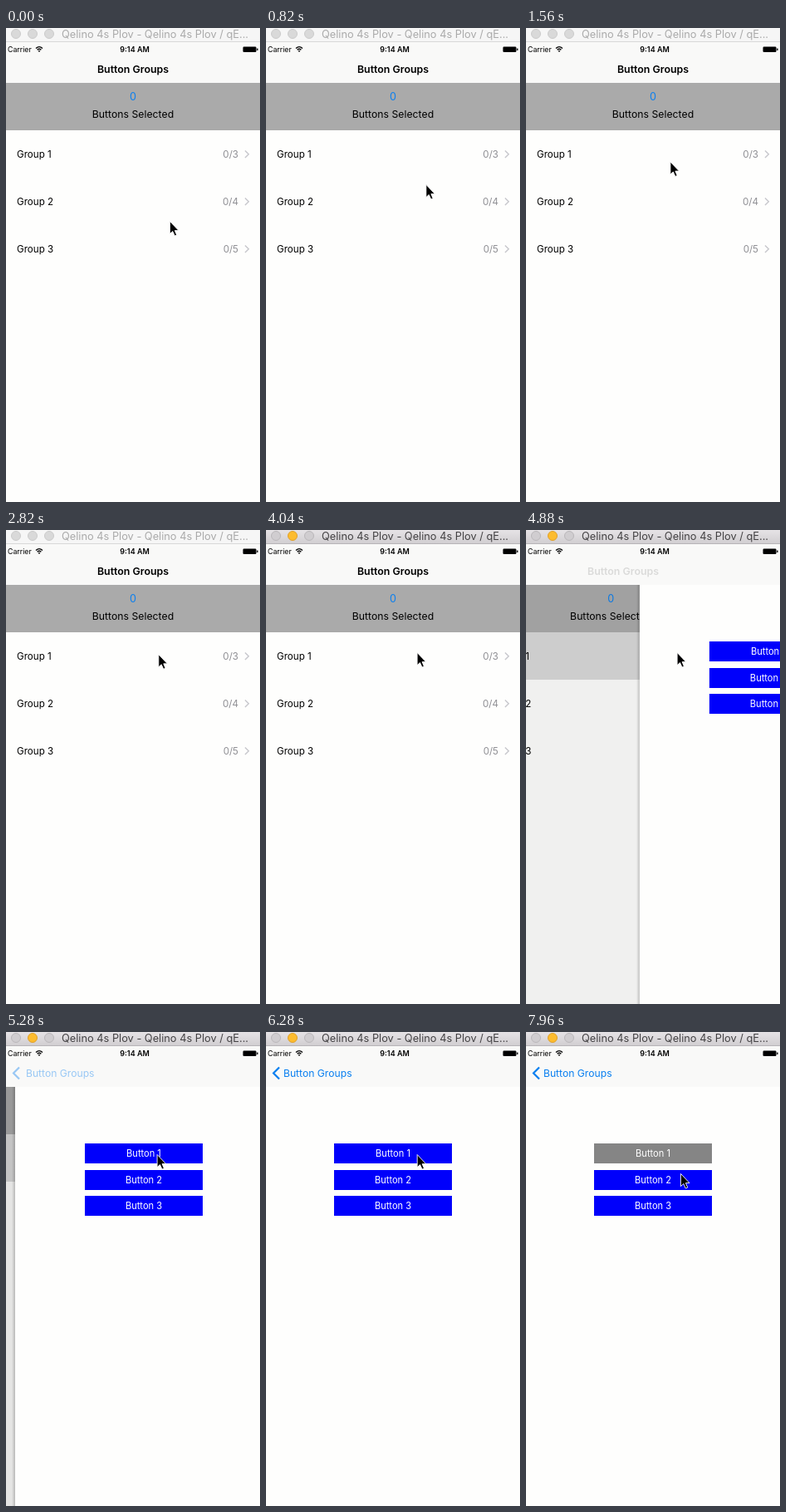
These frames come from a looping animation (306 px wide and 570 px high, 8 s). An HTML page:

```html
<!DOCTYPE html>
<html lang="en">
<head>
<meta charset="utf-8">
<title>Button Groups</title>
<style>
html, body { margin: 0; width: 100%; height: 100%; overflow: hidden; }
svg { display: block; width: 306px; height: 570px; background: #fefefd; font: 11.6px Inter, "Liberation Sans", sans-serif; }
.mid { text-anchor: middle; }
.end { text-anchor: end; }
#bar circle { fill: #d9d9d9; stroke: #cbcbcb; }
#bar text { font-size: 12.8px; fill: #aaa; }
#bar.active circle { fill: #d0cdd0; stroke: #bab7ba; }
#bar.active #amber { fill: #fdbc2e; stroke: #dfa02a; }
#bar.active text { fill: #444244; }
#title { font-size: 12.4px; font-weight: 600; }
#back text { font-size: 12.15px; fill: #0a7ff0; }
.count { fill: #8e8e93; }
.line { fill: none; stroke-width: 1.4; stroke: #c7c7cc; }
</style>
</head>
<body>
<svg viewBox="0 0 306 570">
  <defs>
    <linearGradient id="metal" x2="0" y2="1">
      <stop stop-color="#e6e3e6"/><stop offset="1" stop-color="#d0cdd0"/>
    </linearGradient>
    <linearGradient id="shade">
      <stop stop-opacity="0"/><stop offset="1" stop-opacity=".2"/>
    </linearGradient>
  </defs>

  <g id="list">
    <rect y="66" width="306" height="57" fill="#aaa"/>
    <text class="mid" x="153" y="87" font-size="12.6" fill="#0a7ff0">0</text>
    <text class="mid" x="153" y="108" font-size="12.25">Buttons Selected</text>
    <rect id="mark" y="123" width="306" height="57" fill="#d9d9d9"/>
  </g>
  <rect id="dim" y="66" width="306" height="504"/>

  <g id="page">
    <rect x="-4" y="66" width="4" height="504" fill="url(#shade)"/>
    <rect y="66" width="306" height="504" fill="#fefefd"/>
    <g id="buttons"/>
  </g>

  <rect y="17" width="306" height="49" fill="#f9f9f8"/>
  <text x="2" y="29" font-size="8.8">Carrier</text>
  <path d="M36 24.4Q40 20.8 44 24.4M37.6 26.3Q40 24.2 42.4 26.3" fill="none" stroke="#000" stroke-width="1.3"/>
  <path d="M38.6 27.5Q40 26.5 41.4 27.5L40 29Z"/>
  <text class="mid" x="155" y="29" font-size="9" font-weight="600">9:14 AM</text>
  <rect x="285.5" y="22.5" width="16" height="6.5" rx="1.2"/>
  <rect x="302.2" y="24.5" width="1.3" height="2.5"/>
  <text id="title" class="mid" x="153" y="54">Button Groups</text>
  <g id="back">
    <path class="line" d="M16 42.5L9 49.5L16 56.5" style="stroke:#0a7ff0;stroke-width:2.2"/>
    <text id="label" x="21" y="54">Button Groups</text>
  </g>

  <g id="bar">
    <rect id="top" width="306" height="17"/>
    <rect y="16" width="306" height="1" opacity=".12"/>
    <circle cx="12" cy="7" r="5.5"/>
    <circle id="amber" cx="32" cy="7" r="5.5"/>
    <circle cx="52" cy="7" r="5.5"/>
    <text x="67" y="12">Qelino 4s Plov - Qelino 4s Plov / qE...</text>
  </g>

  <path id="cursor" d="M-.6 -.6V14.6L2.8 11.5L5.3 17L7.7 16L5.4 10.6H10Z" stroke="#fff" stroke-width=".9"/>
</svg>
<script>
const LOOP = 8000, W = 306;
const $ = id => document.getElementById(id);
const clamp = v => Math.min(1, Math.max(0, v));
const move = (id, x, y = 0) => $(id).setAttribute("transform", `translate(${x} ${y})`);
const alpha = (id, a) => $(id).setAttribute("opacity", a);

[3, 4, 5].forEach((total, i) => {
  const y = 156 + 57 * i;
  $("list").insertAdjacentHTML("beforeend",
    `<text x="13" y="${y}">Group ${i + 1}</text>
     <text class="end count" x="280" y="${y}">0/${total}</text>
     <path class="line" d="M288 ${y - 8.5}l4.3 4.3l-4.3 4.3"/>`);
});
[134, 166, 197].forEach((y, i) => {
  $("buttons").insertAdjacentHTML("beforeend",
    `<rect id="button${i + 1}" x="82" y="${y}" width="142" height="24" fill="#0000fb"/>
     <text class="mid" x="153" y="${y + 16}" font-size="11.1" fill="#fff">Button ${i + 1}</text>`);
});

// time, x, y of the pointer tip
const path = [
  [20, 198, 233], [450, 193, 212], [820, 193.5, 189], [1560, 174.5, 161.5],
  [2540, 174.5, 161.5], [2780, 185, 151], [2940, 182.7, 148],
  [6280, 182.7, 148], [6400, 193, 156], [6520, 180, 147],
  [6660, 180, 147], [6900, 188, 160], [7150, 179, 151], [7400, 184, 150],
  [7500, 184, 150], [7960, 187, 171]
];

function pointer(t) {
  const i = path.findIndex(k => k[0] > t);
  if (i < 1) return (i ? path[path.length - 1] : path[0]).slice(1);
  const a = path[i - 1], b = path[i], u = (t - a[0]) / (b[0] - a[0]);
  return [1, 2].map(n => a[n] + (b[n] - a[n]) * u);
}

// Distance the pushed page still has to travel, with a slow tail
function remaining(t) {
  const u = clamp((t - 4126) / 1457);
  if (t >= 5280) return 11 * clamp((6000 - t) / 720);
  return W * (u < .5 ? 1 - 4 * u ** 3 : 4 * (1 - u) ** 3);
}

function draw(t) {
  const off = remaining(t), p = 1 - off / W;
  const active = t >= 4040;
  $("bar").setAttribute("class", active ? "active" : "");
  $("top").setAttribute("fill", active ? "url(#metal)" : "#f6f6f6");
  alpha("mark", t >= 4140 ? 1 : 0);
  move("list", -.3 * W * p);
  alpha("dim", .1 * p);
  move("page", off + (off === W ? 4 : 0));
  move("buttons", Math.min(off, 2));
  move("title", -65 * p);
  alpha("title", clamp(1 - 1.6 * p));
  move("label", .27 * off);
  alpha("back", clamp((t - 5000) / 700));
  $("button1").setAttribute("fill", t >= 7500 ? "#858585" : "#0000fb");
  move("cursor", ...pointer(t));
}

function tick() {
  draw(performance.now() % LOOP);
  requestAnimationFrame(tick);
}
tick();
</script>
</body>
</html>
```
